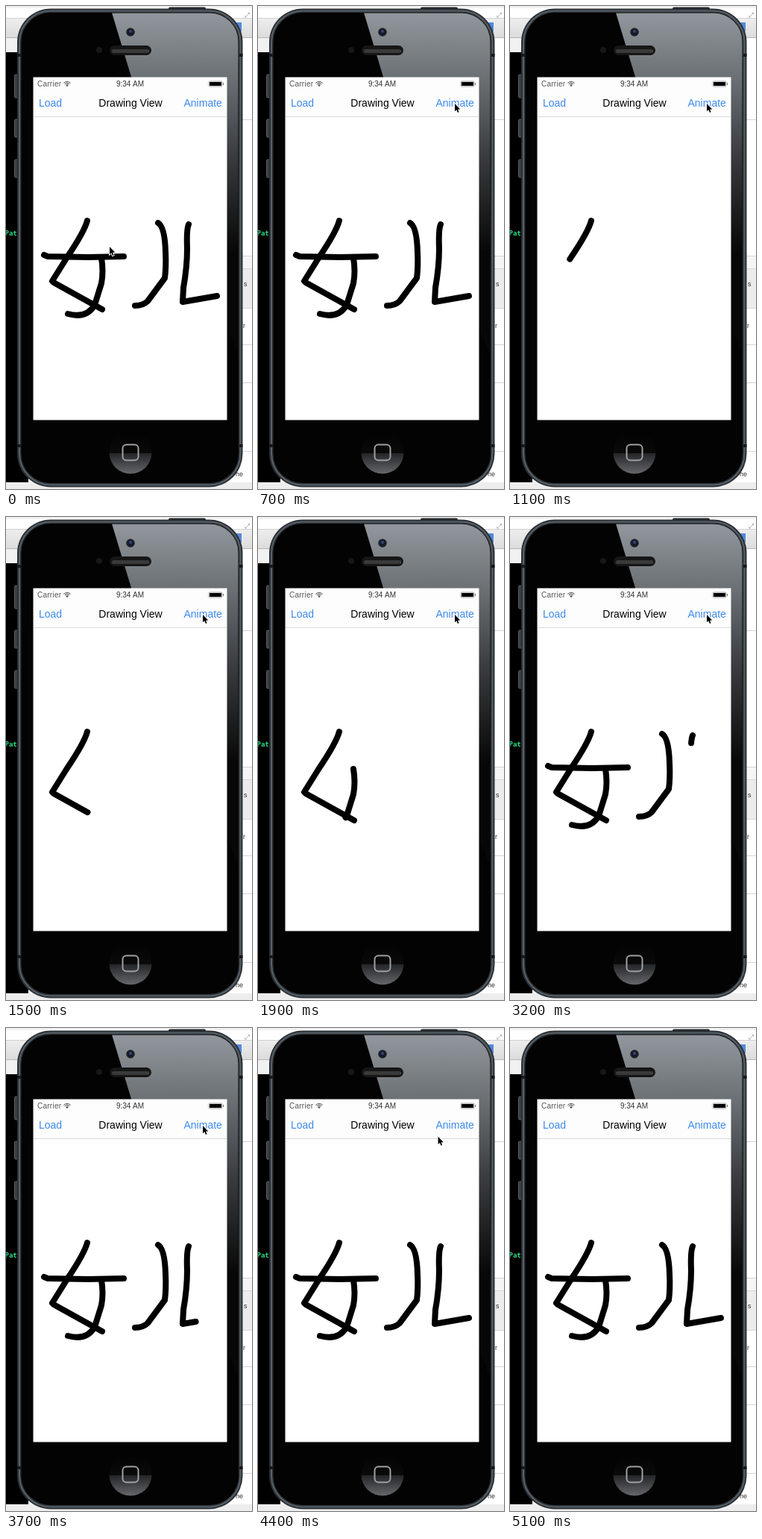
An HTML page with a canvas for the animation above (5600 ms loop, 330 by 648 pixels).

```html
<!DOCTYPE html>
<html lang="en">
<head>
<meta charset="utf-8">
<title>Drawing View</title>
<style>
  html, body { margin: 0; width: 100%; height: 100%; overflow: hidden; background: #fff; }
  canvas { display: block; width: 330px; height: 648px; }
  svg { position: absolute; width: 0; height: 0; }
</style>
</head>
<body>
<canvas id="stage" width="330" height="648"></canvas>
<svg aria-hidden="true">
  <path d="M109 288Q105 303 82 337L62 369L64 371L129 407"/>
  <path d="M128 338Q131 356 128 372L119 401Q108 420 83 413"/>
  <path d="M51 334L56 336L110 337L158 336"/>
  <path d="M204 291Q213 296 214 330Q215 350 213 365L190 396Q184 402 173 402"/>
  <path d="M245 293Q242 300 243 325Q243 350 238 378L237 397L283 389"/>
</svg>
<script>
const canvas = document.getElementById('stage');
const LOOP = 5600, STEP = 100;
const CLEAR_AT = 800, PEN_START = 835, PEN_SPEED = 0.2235, PEN_END = 3900;
const SANS = '"Liberation Sans", Arial, sans-serif';
const MONO = '"DejaVu Sans Mono", monospace';

const strokes = [...document.querySelectorAll('path')].map(path => ({
  shape: new Path2D(path.getAttribute('d')),
  length: path.getTotalLength()
}));

const progress = (time, from, to) => Math.min(1, Math.max(0, (time - from) / (to - from)));
const smooth = k => k * k * (3 - 2 * k);
const mix = (a, b, k) => a + (b - a) * k;

function painter(ctx) {
  const gradient = (y0, y1, ...stops) => {
    const g = ctx.createLinearGradient(0, y0, 0, y1);
    stops.forEach(([at, color]) => g.addColorStop(at, color));
    return g;
  };
  const rect = (x, y, w, h, fill) => {
    ctx.fillStyle = fill;
    ctx.fillRect(x, y, w, h);
  };
  const round = (x, y, w, h, r, fill, stroke, width = 1) => {
    ctx.beginPath();
    ctx.roundRect(x, y, w, h, r);
    if (fill) { ctx.fillStyle = fill; ctx.fill(); }
    if (stroke) { ctx.strokeStyle = stroke; ctx.lineWidth = width; ctx.stroke(); }
  };
  const circle = (x, y, r, fill) => {
    ctx.beginPath();
    ctx.arc(x, y, r, 0, Math.PI * 2);
    ctx.fillStyle = fill;
    ctx.fill();
  };
  const text = (str, x, y, font, color, align = 'left', spacing = 0) => {
    ctx.font = font;
    ctx.fillStyle = color;
    ctx.textAlign = align;
    ctx.letterSpacing = spacing + 'px';
    ctx.fillText(str, x, y);
  };
  return { ctx, gradient, rect, round, circle, text };
}

function drawDesktop({ gradient, rect, text }) {
  rect(0, 0, 330, 648, '#fff');
  rect(0, 0, 330, 3, '#f2f2f2');
  rect(0, 16, 330, 26, gradient(16, 42, [0, '#eee'], [1, '#dcdcdc']));
  rect(0, 16, 330, 1, '#d0d0d0');
  rect(0, 42, 330, 1, '#b5b5b5');
  rect(0, 43, 20, 19, '#f1f1f1');
  rect(0, 62, 30, 577, '#000');
  rect(0, 639, 330, 9, '#ededed');
  text('Pat', -1.5, 308, 'bold 9px ' + MONO, '#2bdc85');

  rect(309, 22, 7, 12, '#5289dc');
  text('⤢', 320, 15, '9px "DejaVu Sans", sans-serif', '#888');
  rect(317, 335, 13, 18, '#f5f5f5');
  rect(317, 353, 13, 52, '#ececec');
  [152, 335, 352, 405, 454, 505, 597].forEach(y => rect(317, y, 13, 1, '#d5d5d5'));
  text('s', 319, 376, '9px ' + SANS, '#333');
  text('r', 318, 432, '9px ' + SANS, '#333');
  text('he', 308, 631, '9px ' + SANS, '#333');
}

function drawPhone({ ctx, gradient, rect, round, circle }) {
  // side and power buttons
  [92, 152, 206].forEach((y, i) => round(11.5, y, 5, i ? 24 : 31, 1.5, '#3a3e42', '#6a6f74', 0.8));
  round(218, 1.5, 50, 5, 2, '#25282b');

  round(15, 3.5, 302.5, 642, 45, '#2b2f33');
  round(18, 6.5, 296.5, 636, 42, null, '#566068', 2);
  round(20.5, 9, 291.5, 631, 39, '#030303');
  [64, 588].forEach(y => {
    rect(15, y, 5, 4, '#17191b');
    rect(313, y, 4.5, 4, '#17191b');
  });

  // glass reflection
  ctx.save();
  ctx.beginPath();
  ctx.roundRect(21, 9.5, 290.5, 630, 38);
  ctx.clip();
  ctx.beginPath();
  ctx.moveTo(142, 9);
  ctx.lineTo(312, 9);
  ctx.lineTo(312, 470);
  ctx.lineTo(168, 95);
  ctx.fillStyle = gradient(10, 330,
    [0, '#92979d'], [0.27, '#6b7074'], [0.6, '#393b3e'], [1, '#070707']);
  ctx.fill();
  ctx.restore();

  circle(167, 35, 5.8, '#22252b');
  circle(167, 35, 4.2, '#141a2d');
  circle(167, 34, 2, '#35466f');
  circle(125, 59, 4, '#171717');
  round(139, 53, 56, 13, 6.5, '#161616');
  round(142, 58, 50, 5, 2.5, '#474747');
  for (let x = 143; x < 191; x += 2) rect(x, 58, 1, 5, '#2c2c2c');

  circle(167, 599, 28.5, gradient(571, 628,
    [0, '#020202'], [0.5, '#0a0a0a'], [0.51, '#232426'], [1, '#66696c']));
  round(156.5, 588.5, 21, 21, 5, null, '#a0a0a0', 2);
}

function drawScreen({ ctx, rect, round, circle, text }) {
  rect(36.5, 95.5, 260, 460, '#fff');
  rect(37, 96, 259, 52, '#fdfdfd');
  rect(37, 148, 259, 1, '#dadada');

  text('Carrier', 42, 108, '10px ' + SANS, '#555', 'left', 0.25);
  text('9:34 AM', 166.5, 108, '10px ' + SANS, '#333', 'center');
  ctx.strokeStyle = '#444';
  ctx.lineWidth = 1;
  for (let r = 2.5; r < 7; r += 2) {
    ctx.beginPath();
    ctx.arc(82, 108, r, -Math.PI * 0.75, -Math.PI * 0.25);
    ctx.stroke();
  }
  circle(82, 107, 0.9, '#444');
  round(272, 101, 18, 7, 1.5, '#fff', '#777', 0.7);
  rect(273, 102, 16, 5, '#000');
  rect(291, 103, 1, 3, '#777');

  const blue = '#3d8aec', font = '14px ' + SANS;
  text('Load', 44, 135, font, blue);
  text('Animate', 238.5, 135, font, blue);
  text('Drawing View', 167, 135, font, '#000', 'center');
}

function drawInk(ctx, time) {
  const complete = time < CLEAR_AT || time >= PEN_END;
  let ink = complete ? Infinity : (time - PEN_START) * PEN_SPEED;
  ctx.save();
  ctx.strokeStyle = '#000';
  ctx.lineWidth = 8;
  ctx.lineCap = ctx.lineJoin = 'round';
  for (const { shape, length } of strokes) {
    if (ink <= 0) break;
    ctx.setLineDash(ink < length ? [ink, 1000] : []);
    ctx.stroke(shape);
    ink -= length;
  }
  ctx.restore();
}

// glides to "Animate", later swings below the bar to "Load" and off the phone
function pointerAt(time) {
  const enter = smooth(progress(time, 0, 600));
  const swing = progress(time, 4300, 4700) ** 1.6;
  const leave = progress(time, 4900, 5100);
  return [
    mix(139, 264, enter) - 206 * swing - 50 * leave,
    mix(323, 131, enter) + 44 * Math.sin(Math.PI * swing) - 10 * leave
  ];
}

const arrow = new Path2D('M0 0V11.5L2.6 9.2L4.4 13.4L6.2 12.6L4.5 8.5L8 8.2Z');

function drawPointer(ctx, time) {
  if (time >= 5100) return;
  ctx.save();
  ctx.translate(...pointerAt(time));
  ctx.scale(0.9, 0.9);
  ctx.strokeStyle = '#fff';
  ctx.lineWidth = 2;
  ctx.stroke(arrow);
  ctx.fillStyle = '#000';
  ctx.fill(arrow);
  ctx.restore();
}

const backdrop = document.createElement('canvas');
backdrop.width = canvas.width;
backdrop.height = canvas.height;
const still = painter(backdrop.getContext('2d'));
[drawDesktop, drawPhone, drawScreen].forEach(draw => draw(still));

const stage = canvas.getContext('2d');
let start;
function render(now) {
  start ??= now;
  const time = Math.floor(((now - start) % LOOP) / STEP) * STEP;
  stage.drawImage(backdrop, 0, 0);
  drawInk(stage, time);
  drawPointer(stage, time);
  requestAnimationFrame(render);
}
requestAnimationFrame(render);
</script>
</body>
</html>
```
